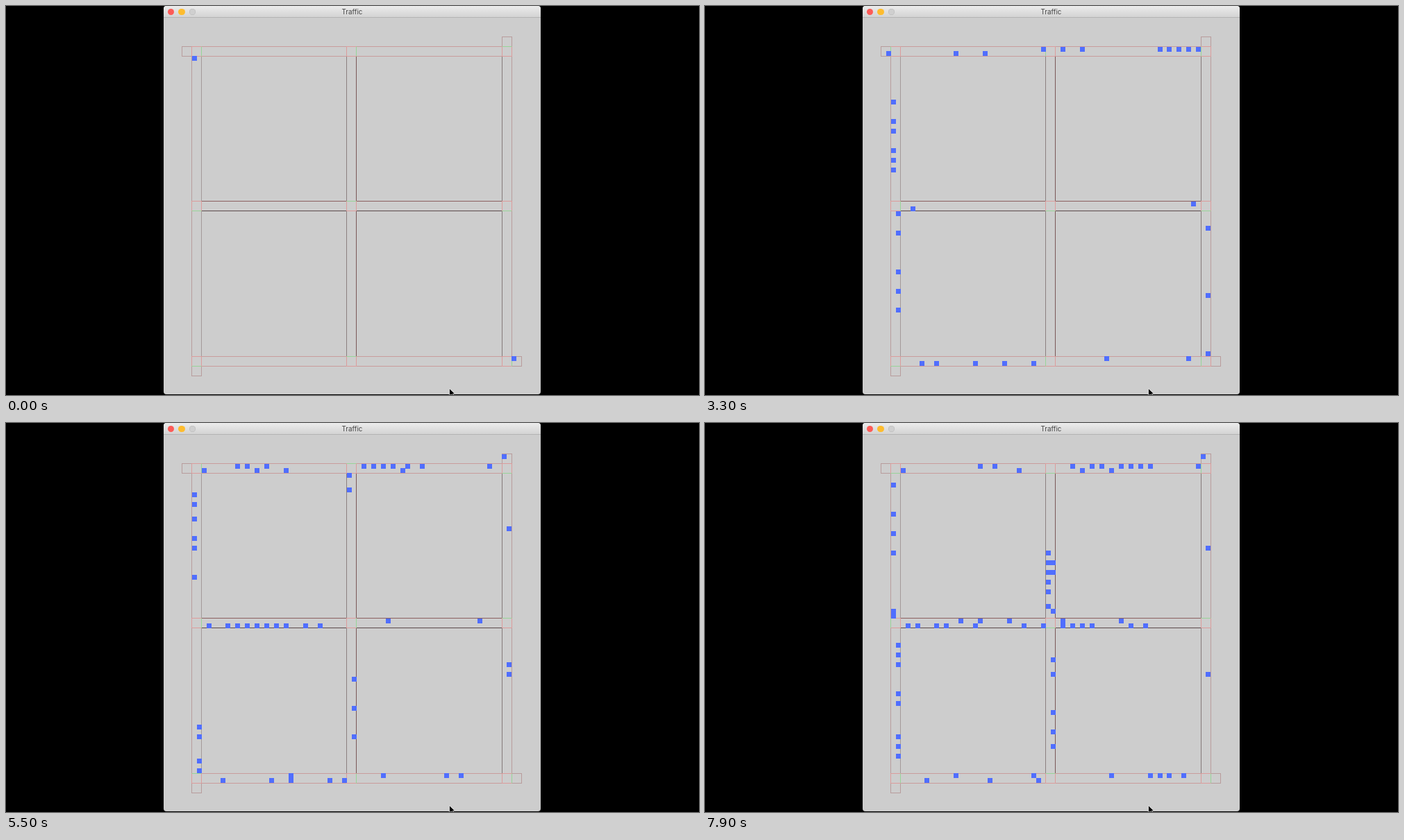
An HTML page with a canvas that plays this animation: 998x561 px, repeating every 8000 ms.

```html
<!DOCTYPE html>
<html lang="en">
<head>
<meta charset="utf-8">
<title>Traffic</title>
<style>
html, body { margin: 0; width: 100%; height: 100%; overflow: hidden; background: #000; }
.win { position: absolute; left: 227px; top: 0; width: 543px; height: 559.5px; background: #cdcdcd; border-radius: 4px; overflow: hidden; }
.bar { position: relative; height: 16px; background: linear-gradient(#ececec, #d3d3d3); border-bottom: 1px solid #b4b4b4;
  font: 9.8px/17px Inter, "Liberation Sans", sans-serif; color: #444; text-align: center; }
.bar i { position: absolute; top: 4px; width: 9.4px; height: 9.4px; border-radius: 50%; }
canvas, svg { position: absolute; left: 0; top: 0; }
</style>
</head>
<body>
<div class="win"><div class="bar">
  <i style="left:6px;background:#fc5b57"></i>
  <i style="left:21.4px;background:#fdbc2e"></i>
  <i style="left:36.8px;background:#cfcfcf;box-shadow:inset 0 0 0 .6px #b9b9b9"></i>
  Traffic
</div></div>
<canvas id="c" width="998" height="561"></canvas>
<svg width="998" height="561"><path d="M638.5 551.5v11l2.6-2.5 2 4h2l-1.8-4.4h3.4z" fill="#000" stroke="#e8e8e8" stroke-width=".8"/></svg>
<script>
const ctx = document.getElementById('c').getContext('2d');
const CELL = 6.98, X0 = 267.6, Y0 = 58.5, SPAN = 32, BLOCK = 30;
const STEP = 100, FRAMES = 80, PAUSE = 32;

const px = c => X0 + c * CELL, py = r => Y0 + r * CELL;
const snap = v => Math.floor(v) + 0.5;

const DIR = { E: [1, 0], W: [-1, 0], S: [0, 1], N: [0, -1] };

// Cell number k (0 is the first one) on the lane leaving junction (i, j) towards d
function lane(i, j, d, k) {
  const x = i * SPAN, y = j * SPAN;
  return { E: [x + 2 + k, y + 1], W: [x - 1 - k, y], S: [x, y + 2 + k], N: [x + 1, y - 1 - k] }[d];
}

// gate: junction and heading of arriving cars, and how many stub cells they show on
const GATES = {
  W: { at: [0, 0], d: 'E', lead: 1 },
  N: { at: [2, 0], d: 'S', lead: 2 },
  E: { at: [2, 2], d: 'W', lead: 1 },
  S: { at: [0, 2], d: 'N', lead: 1 }
};

// gate, headings after each junction, steps at which cars pass the first junction
const TRIPS = [
  ['W', 'EEN', [15]],
  ['W', 'ES', [21]],
  ['W', 'EE', [37, 43, 54, 78]],
  ['W', 'SEN', [9]],
  ['W', 'SEE', [0, 11, 13, 17, 19, 23, 33, 39, 41, 45, 50, 66, 70, 76]],
  ['W', 'S', [48]],
  ['N', 'WWS', [2], 1],
  ['N', 'WWW', [4, 8]],
  ['N', 'WS', [24, 26, 28, 30, 32]],
  ['N', 'WW', [35, 38, 52, 56, 58, 62, 64, 66, 68, 78, 80]],
  ['S', 'NEN', [7]],
  ['S', 'NEE', [3, 15, 19, 23, 45, 47, 52, 54, 56, 62, 64, 71, 73, 75]],
  ['S', 'ENW', [5, 11]],
  ['S', 'ENN', [17, 25, 28, 36, 40, 50, 60, 73]],
  ['E', 'WWS', [13]],
  ['E', 'WN', [43]],
  ['E', 'WW', [30, 46, 60, 68, 70, 72, 75]],
  ['E', 'NWW', [1, 20, 32]],
  ['E', 'NNN', [6]],
  ['E', 'NN', [34, 58]]
];

const cars = TRIPS.flatMap(([gate, way, times, lead = GATES[gate].lead]) => {
  const { at, d } = GATES[gate], path = [];
  let [i, j] = at;
  for (let k = lead; k; k--) path.push(lane(i - DIR[d][0], j - DIR[d][1], d, BLOCK - k));
  for (const h of way) {
    const ni = i + DIR[h][0], nj = j + DIR[h][1];
    if (Math.min(ni, nj) < 0 || Math.max(ni, nj) > 2) {
      path.push(lane(i, j, h, 0), [-99, -99]);   // leaves the map
      break;
    }
    for (let k = 0; k < BLOCK; k++) path.push(lane(i, j, h, k));
    i = ni; j = nj;
  }
  return times.map(t => ({ path, start: t - lead }));
});

// Green side of the nine junctions, row by row, at some steps
const LIGHTS = [
  [0, 'RRTBTBBTR'], [16, 'LLBBTTBTR'], [32, 'LLLRBBBLL'], [46, 'LBTLLBBLL'],
  [62, 'LBTLTBLTT'], [70, 'RLTRRTBLT'], [78, 'BBLLBTRTR']
];
const SIDES = 'TRBL';

function line(x1, y1, x2, y2, color) {
  ctx.strokeStyle = color;
  ctx.beginPath();
  ctx.moveTo(snap(x1), snap(y1));
  ctx.lineTo(snap(x2), snap(y2));
  ctx.stroke();
}

const PINK = '#c99c9c', GREY = '#a39a9a', ROSE = '#b89c9c';
const ROWS = [[PINK, PINK], ['#8b5f5f', '#5c4a4c'], [PINK, PINK]];
const COLS = [[ROSE, GREY], ['#8c8080', '#7a5858'], ['#857a7a', ROSE]];

function roads() {
  for (let n = 0; n < 3; n++) for (let b = 0; b < 2; b++) {
    const a = b * SPAN + 2, z = a + BLOCK;
    for (let e = 0; e < 2; e++) {
      const m = n * SPAN + e * 2;
      line(px(a), py(m), px(z), py(m), ROWS[n][e]);
      line(px(m), py(a), px(m), py(z), COLS[n][e]);
    }
  }
  for (const [c, r] of [[-2, 0], [64, -2], [66, 64], [0, 66]]) {
    ctx.strokeStyle = ROSE;
    const x = snap(px(c)), y = snap(py(r));
    ctx.strokeRect(x, y, snap(px(c + 2)) - x, snap(py(r + 2)) - y);
  }
}

function lights(s) {
  const [from, code] = LIGHTS.filter(l => l[0] <= s).pop();
  const turn = Math.floor((s - from) / 4);
  for (let n = 0; n < 9; n++) {
    const c = n % 3 * SPAN, r = Math.floor(n / 3) * SPAN;
    const x = px(c), y = py(r), X = px(c + 2), Y = py(r + 2);
    const edges = [[x, y, X, y], [X, y, X, Y], [x, Y, X, Y], [x, y, x, Y]];
    const go = (SIDES.indexOf(code[n]) + turn) % 4;
    edges.forEach(e => line(...e, '#dc9c9c'));
    line(...edges[go], '#98d498');
  }
}

function draw(s) {
  ctx.clearRect(0, 0, 998, 561);
  ctx.lineWidth = 1;
  roads();
  lights(s);
  ctx.fillStyle = '#506eff';
  for (const { path, start } of cars) {
    if (s < start) continue;
    const [c, r] = path[Math.min(s - start, path.length - 1)];
    ctx.fillRect(Math.round(px(c)), Math.round(py(r)), 7, 7);
  }
}

const t0 = performance.now();
function tick() {
  const n = Math.floor((performance.now() - t0) / STEP) % FRAMES;
  draw(n < PAUSE ? n : n - 1);
  requestAnimationFrame(tick);
}
tick();
</script>
</body>
</html>
```
